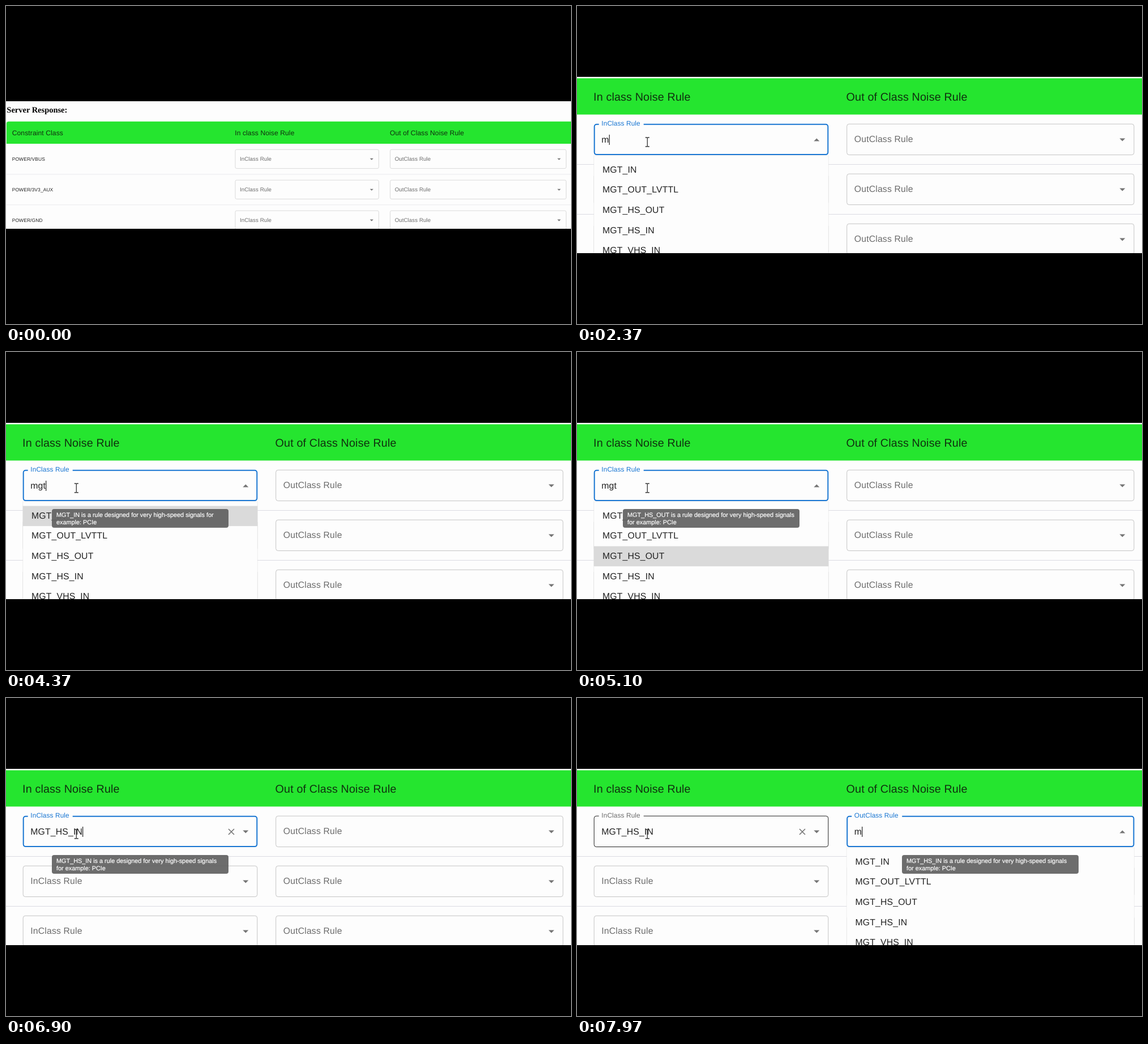
These frames come from a looping animation (998x561 px, 8 s). An HTML page:

```html
<!DOCTYPE html>
<html lang="en">
<head>
<meta charset="utf-8">
<title>Noise rule table</title>
<style>
html, body { margin: 0; width: 100%; height: 100%; overflow: hidden; background: #000; }
svg { display: block; width: 998px; height: 561px; }
text { font-family: "Liberation Sans", Arial, Helvetica, sans-serif; font-size: 15.8px;
  letter-spacing: .148px; fill: #212121; white-space: pre; text-rendering: geometricPrecision; }
.title { font: bold 23.6px "Liberation Serif", "Times New Roman", serif; letter-spacing: 0; fill: #000; }
.head { font-size: 19.74px; fill: #10300f; }
.cell { font-size: 13.8px; }
.tip text { font-size: 10.86px; letter-spacing: 0; fill: #fff; stroke: #fff; stroke-width: .2px; }
</style>
</head>
<body>
<svg id="stage" viewBox="0 0 998 561">
  <defs><clipPath id="band"><rect id="clip" width="998"/></clipPath></defs>
  <g clip-path="url(#band)">
    <rect width="998" height="561" fill="#fdfdfd"/>
    <g id="page"></g>
  </g>
</svg>
<script>
const LOOP = 8000, WHITE = '#fdfdfd';
const GRAY = [108, 108, 108], BLUE = [25, 118, 210], DARK = [33, 33, 33];
const ZOOM = 1.6316;
const IN = { x: 29.7, w: 414.6, name: 'InClass Rule', label: 69 };
const OUT = { x: 476.2, w: 508.2, name: 'OutClass Rule', label: 79 };
const ROWS = [208, 296, 384];

// Moments of the session, in ms
const AT = { hover: 570, click: 800, cut: 1930, m: 2100, g: 2600, t: 2970,
  enter: 6750, tab: 7295, m2: 7700 };
const PICKS = [3900, 4560, 4950, 5330];

const ALL = ['NONE', 'NOT_CRITICAL', 'REGULAR', 'CRITICAL_NT', 'CRITICAL_T_IN'];
const MGT = ['MGT_IN', 'MGT_OUT_LVTTL', 'MGT_HS_OUT', 'MGT_HS_IN', 'MGT_VHS_IN'];
const RULE = ' is a rule designed for very high-speed';
const TIPS = [
  [MGT[0] + RULE + ' signals for', 'example: PCIe'],
  [MGT[1] + RULE, 'signals for example: PCIe'],
  [MGT[2] + RULE + ' signals', 'for example: PCIe'],
  [MGT[3] + RULE + ' signals', 'for example: PCIe']
];

const page = document.getElementById('page');
const clip = document.getElementById('clip');

function set(el, attrs) {
  for (const k in attrs) el.setAttribute(k, attrs[k]);
  return el;
}
function add(parent, tag, attrs) {
  return parent.appendChild(set(document.createElementNS('http://www.w3.org/2000/svg', tag), attrs));
}
function write(parent, str, x, y, cls) {
  const el = add(parent, 'text', { x, y });
  if (cls) el.setAttribute('class', cls);
  el.textContent = str;
  return el;
}
const show = (el, on) => el.setAttribute('visibility', on ? 'visible' : 'hidden');
const clamp = v => Math.max(0, Math.min(1, v));
const lerp = (a, b, p) => a + (b - a) * p;
const mix = (a, b, p) => `rgb(${a.map((v, i) => Math.round(lerp(v, b[i], p)))})`;

// Cubic bezier easing with end heights 0 and 1
function bezier(x1, x2) {
  return v => {
    v = clamp(v);
    let lo = 0, hi = 1, s = v;
    for (let i = 0; i < 24; i++) {
      s = (lo + hi) / 2;
      const x = 3 * (1 - s) * (1 - s) * s * x1 + 3 * (1 - s) * s * s * x2 + s ** 3;
      if (x < v) lo = s; else hi = s;
    }
    return s * s * (3 - 2 * s);
  };
}
const easeOut = bezier(0, .2), easeStd = bezier(.4, .2);

function makeField(col, y) {
  const g = add(page, 'g', {});
  const box = add(g, 'rect', { rx: 4, fill: 'none' });
  const notch = add(g, 'rect', { y: y - 2, height: 5, fill: WHITE });
  const label = write(g, col.name, 0, 0);
  const value = write(g, '', col.x + 13.6, y + 33);
  const caret = add(g, 'rect', { y: y + 19, width: 1.2, height: 18, fill: '#222' });
  const arrow = add(g, 'path', { fill: '#757575' });
  const ax = col.x + col.w - 21, ay = y + 25.5;
  const cross = add(g, 'path', { stroke: '#757575', 'stroke-width': 1.6,
    d: `M${ax - 30.3} ${y + 23}l10 10m0-10l-10 10` });
  return o => {
    const s = { line: 1, color: '#c4c4c4', shrink: 0, ink: mix(GRAY, GRAY, 0),
      text: '', caret: false, open: false, clear: false, ...o };
    const h = s.line / 2, p = s.shrink;
    set(box, { x: col.x + h, y: y - .3 + h, width: col.w - s.line, height: 55.4 - s.line,
      stroke: s.color, 'stroke-width': s.line });
    set(notch, { x: col.x + 9, width: (col.label + 10) * clamp(p * 1.5) });
    set(label, { transform: `translate(${col.x + 13.6} ${lerp(y + 32.3, y + 3.4, p)}) scale(${lerp(1, .75, p)})` });
    label.style.fill = s.ink;
    if (value.textContent !== s.text) value.textContent = s.text;
    const end = s.text ? value.getComputedTextLength() : .2;
    set(caret, { x: col.x + 13.6 + end });
    show(caret, s.caret);
    set(arrow, { d: s.open ? `M${ax - 5} ${ay + 5}l5-5 5 5z` : `M${ax - 5} ${ay}l5 5 5-5z` });
    show(cross, s.clear);
  };
}

function makeMenu(col) {
  const g = add(page, 'g', {});
  add(g, 'rect', { x: col.x, y: 264, width: col.w, height: 220, fill: WHITE,
    stroke: '#000', 'stroke-opacity': .06 });
  const mark = add(g, 'rect', { x: col.x, width: col.w, height: 35.5, fill: '#dadada' });
  const lines = MGT.map((_, i) => write(g, '', col.x + 15.3, 293.8 + i * 35.65));
  const right = col.x + col.w;
  const bar = add(g, 'g', {});
  add(bar, 'rect', { x: right - 15, y: 264, width: 15, height: 200, fill: '#f1f1f1' });
  add(bar, 'rect', { x: right - 13.3, y: 278, width: 11.6, height: 90, fill: '#c1c1c1' });
  add(bar, 'path', { d: `M${right - 11} 274l3.5-4 3.5 4z`, fill: '#777' });
  return (open, list, pick) => {
    g.style.display = open ? '' : 'none';
    lines.forEach((el, i) => { if (el.textContent !== list[i]) el.textContent = list[i]; });
    mark.setAttribute('y', 271.6 + pick * 35.5);
    mark.style.display = pick >= 0 ? '' : 'none';
    bar.style.display = list === ALL ? '' : 'none';
  };
}

function makeTip(x) {
  const g = add(page, 'g', { class: 'tip' });
  add(g, 'rect', { x: -156, width: 312, height: 33, rx: 4, fill: '#616161', 'fill-opacity': .92 });
  const lines = [write(g, '', -148, 14.2), write(g, '', -148, 26.8)];
  return (words, alpha, grow) => {
    lines.forEach((el, i) => { if (el.textContent !== words[i]) el.textContent = words[i]; });
    set(g, { opacity: alpha,
      transform: `translate(${x + 156} 277) scale(${lerp(.75, 1, grow)} ${lerp(.5625, 1, grow)})` });
  };
}

// Fixed parts of the table
write(page, 'Server Response:', -628.3, 102, 'title');
add(page, 'path', { d: 'M-629 191.5V133.5q0-6 6-6H1010V191.5z', fill: '#25e52f' });
write(page, 'Constraint Class', -613, 166.6, 'head');
write(page, 'In class Noise Rule', 29, 166.6, 'head');
write(page, 'Out of Class Noise Rule', 475.6, 166.6, 'head');
['POWER/VBUS', 'POWER/3V3_AUX', 'POWER/GND'].forEach((s, i) => {
  write(page, s, -613, ROWS[i] + 32, 'cell');
  add(page, 'rect', { x: -629, y: ROWS[i] + 71, width: 1640, height: 1, fill: '#dcdce2' });
});

const inFields = ROWS.map(y => makeField(IN, y));
const outFields = ROWS.map(y => makeField(OUT, y));
for (const i of [1, 2]) { inFields[i]({}); outFields[i]({}); }
const inMenu = makeMenu(IN), outMenu = makeMenu(OUT);
const inTip = makeTip(81), outTip = makeTip(574);
const beam = add(page, 'path', { fill: 'none', stroke: '#333', 'stroke-width': 1.3,
  d: 'M-3.5-8h2.3q1.2 0 1.2 1.2q0-1.2 1.2-1.2h2.3M0-7V7M-3.5 8h2.3q1.2 0 1.2-1.2q0 1.2 1.2 1.2h2.3' });

function draw(t) {
  const wide = t < AT.cut;
  set(clip, wide ? { y: 168, height: 225 } : { y: 125, height: 311 });
  set(page, { transform: wide ? `scale(${1 / ZOOM}) translate(630.5 205)` : 'scale(1)' });

  const focusIn = t >= AT.click && t < AT.tab, focusOut = t >= AT.tab;
  const typed = t < AT.m ? '' : t < AT.g ? 'm' : t < AT.t ? 'mg' : t < AT.enter ? 'mgt' : MGT[3];
  const key = [AT.click, AT.m, AT.g, AT.t, AT.enter, AT.tab, AT.m2].filter(k => k <= t).pop();
  const blink = Math.floor((t - key) / 600) % 2 === 0;
  const openIn = t >= AT.click && t < AT.enter, openOut = t >= AT.m2;
  const lit = easeOut((t - AT.click) / 200), out = easeOut((t - AT.tab) / 200);

  inFields[0]({
    line: focusIn ? 2 : 1,
    color: focusIn ? mix(BLUE, BLUE, 0) : focusOut ? mix(BLUE, DARK, out)
      : t >= AT.hover ? mix(DARK, DARK, 0) : '#c4c4c4',
    shrink: lit,
    ink: focusOut ? mix(BLUE, GRAY, out) : mix(GRAY, BLUE, lit),
    text: typed, caret: focusIn && blink, open: openIn, clear: t >= AT.enter
  });
  outFields[0]({
    line: focusOut ? 2 : 1,
    color: focusOut ? mix(BLUE, BLUE, 0) : '#c4c4c4',
    shrink: out, ink: mix(GRAY, BLUE, out),
    text: openOut ? 'm' : '', caret: focusOut && blink, open: openOut
  });

  const pick = PICKS.filter(k => k <= t).length - 1;
  inMenu(openIn, t < AT.m ? ALL : MGT, pick);
  outMenu(openOut, MGT, -1);

  const words = TIPS[Math.max(0, pick)], since = t - AT.tab;
  const enter = d => [easeStd(d / 205), easeStd(d / 157)];
  if (focusOut) inTip(words, 1 - easeStd(since / 275), 1 - easeStd((since - 70) / 200));
  else inTip(words, ...enter(t - PICKS[0]));
  outTip(words, ...enter(since));

  const move = easeStd((t - AT.hover) / 150);
  set(beam, { transform: `translate(${lerp(136, 124.3, move)} ${lerp(262, 240, move)})` });
  show(beam, t >= AT.hover);
}

function tick() {
  draw(performance.now() % LOOP);
  requestAnimationFrame(tick);
}
tick();
</script>
</body>
</html>
```
